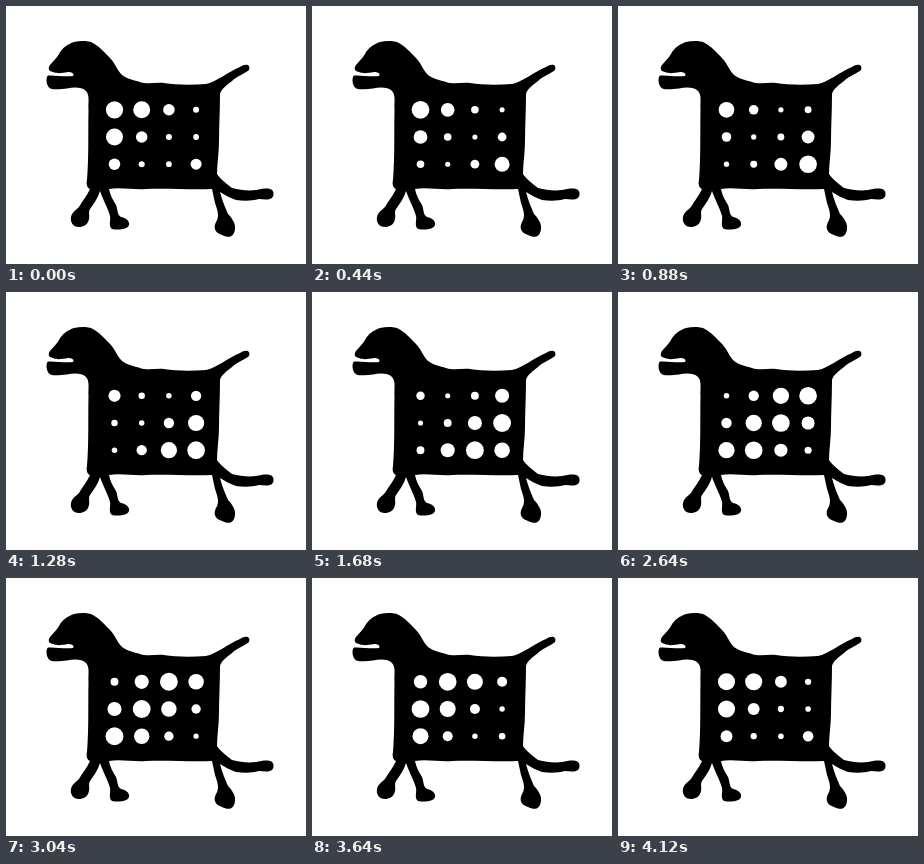
An HTML page that plays this animation: 300x258 px, repeating every 4.16 s.

```html
<!DOCTYPE html>
<html lang="en">
<head>
<meta charset="utf-8">
<title>Spotted animal</title>
<style>
html, body { margin: 0; width: 100%; height: 100%; overflow: hidden; background: #fff; }
svg { display: block; width: 300px; height: 258px; }
</style>
</head>
<body>
<svg viewBox="0 0 300 258">
  <!-- head, back and upright tail; hind tail and leg; front legs; chest and jaw -->
  <path d="M44 59 C47 55 51 52 53 48 C56 42 62 38 68 36 C74 34.5 82 34.5 86 36.5
    C93 40 99 47 104 52 C109 57 111 64 116 69 C121 73 128 74 134 76
    C142 79 150 76 158 77 C170 79 185 79 200 78 C210 76 222 66 234 61
    C240 57 245 59 243 64 C238 68 231 70 226 75 C221 79 215 83 214 88
    C214 105 213 120 213 135 C213 147 211 157 211 168
    C214 173 220 177 226 182 C234 184 242 185 250 184 C258 182 267 181 267.5 187
    C268 194 262 194 253 193 C246 195 238 195 230 194 C224 192 219 189 214 186
    C216 194 219 201 222 208 C226 212 230 218 229 223 C228 232 222 232 216 229
    C209 227 207 222 210 216 C214 210 211 203 209 197 L206 183
    C185 184 160 182 140 183 C128 184 114 181 103 183 C104 189 107 194 110 199
    C112 204 111 209 115 211 C121 212 124 216 123 219 C121 224 112 224 106 223
    C102 220 105 214 104 210 C102 202 97 194 94 185
    C92 192 88 197 84 203 C82 206 84 210 83 213 C82 219 77 221 73 221
    C67 221 64 216 65 211 C66 206 70 204 73 201 C76 195 81 190 84 183
    C81 182 80 178 81 174 C83 150 82 125 82.5 104 C82 97 84 89 80 85
    C76 81 68 81 61 82.5 C54 83 44 85 42 80 C40 77 40 71 42 69.5
    C50 69 58 71 67 70 C69 67 65 66 62 66 C56 67 51 68 47 66 C42 65 42 62 44 59 Z"/>
  <g id="spots" fill="#fff"></g>
</svg>
<script>
const LOOP = 4160, STEP = 40, LAG = 675, PEAK = 310;
const group = document.getElementById('spots');
const spots = [];

for (let row = 0; row < 3; row++) {
  for (let col = 0; col < 4; col++) {
    const el = document.createElementNS('http://www.w3.org/2000/svg', 'circle');
    el.setAttribute('cx', 108.5 + 27.2 * col);
    el.setAttribute('cy', 103.8 + 27.2 * row);
    group.append(el);
    spots.push({ el, diagonal: row + col });
  }
}

// Each diagonal swells ahead of the one to its upper left.
function draw(now) {
  const t = Math.floor(now % LOOP / STEP) * STEP;
  for (const { el, diagonal } of spots) {
    const phase = 2 * Math.PI * (t - PEAK + LAG * diagonal) / LOOP;
    el.setAttribute('r', 5.75 + 3.2 * Math.cos(phase));
  }
}

const start = performance.now();
function tick() {
  draw(performance.now() - start);
  requestAnimationFrame(tick);
}
tick();
</script>
</body>
</html>
```
